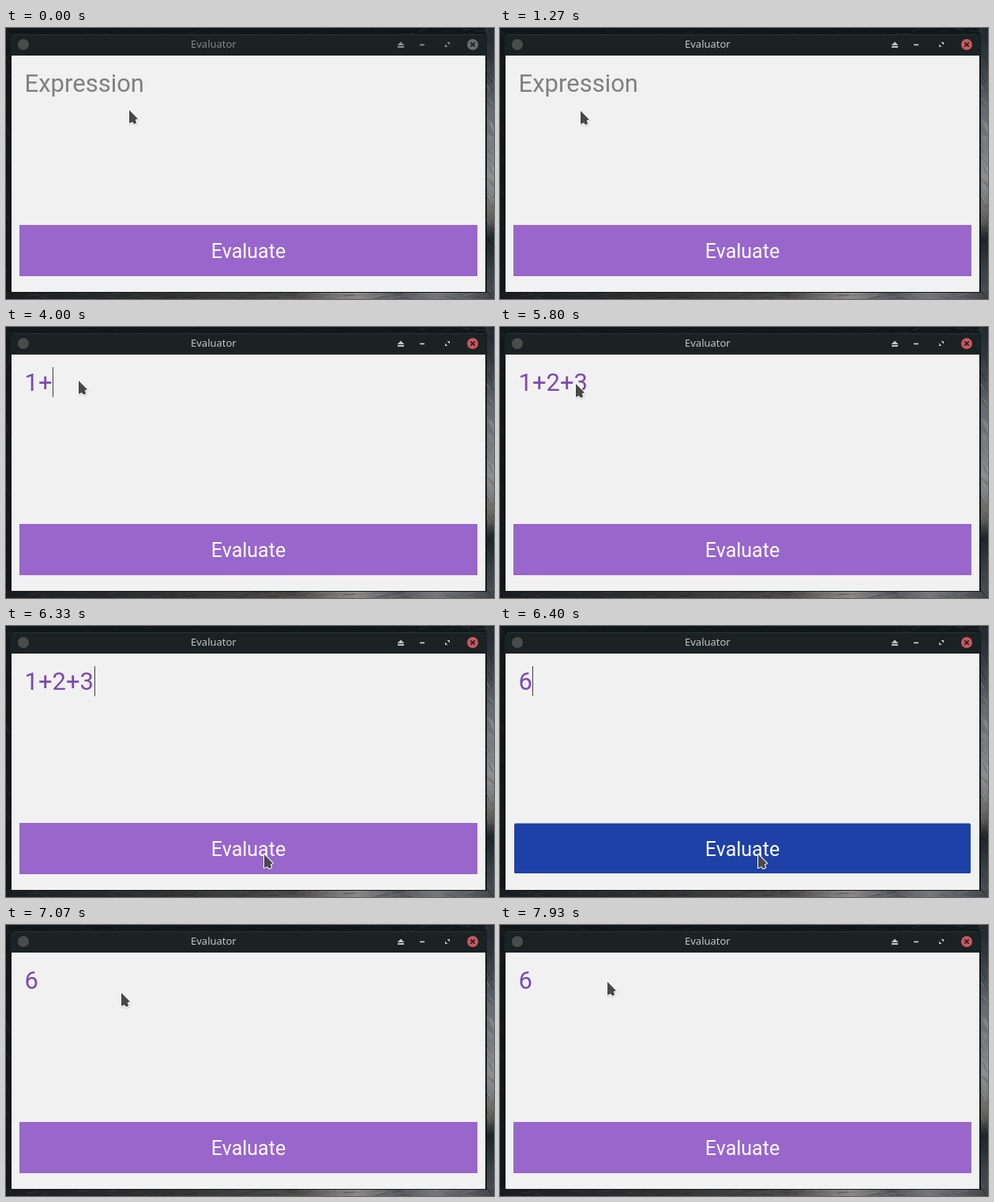
Animation of 618x344 px, one loop 8 s. Source, as an HTML page:

```html
<!DOCTYPE html>
<html lang="en">
<head>
<meta charset="utf-8">
<title>Evaluator</title>
<style>
  html, body { margin: 0; width: 100%; height: 100%; overflow: hidden; background: #11181c; }
  svg { display: block; width: 618px; height: 344px; }
  text { white-space: pre; }
  .app { font-family: Roboto, sans-serif; }
</style>
</head>
<body>
<svg viewBox="0 0 618 344">
  <defs>
    <linearGradient id="side" x2="0" y2="1">
      <stop offset="0" stop-color="#20272d"/>
      <stop offset=".1" stop-color="#2e353c"/>
      <stop offset=".3" stop-color="#636970"/>
      <stop offset=".55" stop-color="#8a8d90"/>
      <stop offset=".7" stop-color="#66635f"/>
      <stop offset=".78" stop-color="#1c2228"/>
      <stop offset=".9" stop-color="#3a4148"/>
      <stop offset="1" stop-color="#505458"/>
    </linearGradient>
    <linearGradient id="floor">
      <stop offset="0" stop-color="#1a1d1f"/>
      <stop offset=".35" stop-color="#333333"/>
      <stop offset=".6" stop-color="#4f4d4c"/>
      <stop offset=".72" stop-color="#8c8a88"/>
      <stop offset=".8" stop-color="#55555a"/>
      <stop offset=".88" stop-color="#77777a"/>
      <stop offset="1" stop-color="#404448"/>
    </linearGradient>
  </defs>

  <rect width="618" height="344" fill="#11181c"/>
  <rect x="607" width="11" height="344" fill="url(#side)"/>
  <rect y="335" width="618" height="9" fill="url(#floor)"/>
  <g id="fur" stroke-width="1"></g>

  <path d="M5 336V12q0-4 4-4H605q4 0 4 4V336Z" fill="#141a1c"/>
  <path d="M6 35V12q0-3 3-3H605q3 0 3 3V35Z" fill="#1b2224"/>
  <path d="M9 8.5H605" stroke="#2a3234"/>
  <rect x="7" y="35" width="600" height="300" fill="#f1f1f1"/>

  <circle cx="22" cy="21" r="7" fill="#4b4b4b"/>
  <text id="title" x="234" y="25" font-size="13" font-family="Noto Sans, sans-serif">Evaluator</text>
  <g id="controls">
    <path d="M495.5 22L500 17.5L504.500 22ZM496 23h8v2h-8ZM524 20.500h6v1.700h-6ZM558.500 18h3.500v3.500ZM556 20.500v3.500h3.500Z"/>
  </g>
  <circle id="close" cx="591" cy="21" r="7"/>
  <path d="M588.300 18.300l5.400 5.400m0-5.400l-5.400 5.400" stroke="#1b2224" stroke-width="1.700"/>

  <text id="input" class="app" x="23.6" y="81" font-size="31"></text>
  <rect id="caret" y="51" width="1" height="38" fill="#404040"/>

  <rect id="button"/>
  <text class="app" x="307" y="292" font-size="25" fill="#fff" text-anchor="middle">Evaluate</text>

  <g id="mouse" stroke-linejoin="round">
    <path d="M0 0L11 11.200L7.800 12.400L9.300 16.500L6.300 18L4 15.200L0 17Z"
      fill="none" stroke="#000" stroke-opacity=".1" stroke-width="3" transform="translate(.5 1)"/>
    <path d="M0 0L11 11.200L7.800 12.400L9.300 16.500L6.300 18L4 15.200L0 17Z"
      fill="#484848" stroke="#fff" stroke-width="2" paint-order="stroke"/>
  </g>
</svg>
<script>
const $ = id => document.getElementById(id);
const set = (id, attrs) => {
  for (const k in attrs) $(id).setAttribute(k, attrs[k]);
};

// Times are in ticks of 1/15 s.
const TICKS = 120;
const path = [
  [3, 156, 104], [6, 101, 83], [16, 101, 83], [20, 102, 106], [21, 102, 106],
  [26, 92, 71], [27, 92, 71], [29, 92, 68], [86, 92, 68], [87, 96, 72],
  [94, 327, 290], [100, 327, 290], [108, 135, 74], [110, 136, 72]
];
const typed = [
  [0, ''], [55, '1'], [60, '1+'], [69, '1+2'], [74, '1+2+'], [80, '1+2+3'], [96, '6']
];
const caretOn = [[29, 37], [45, 52], [55, 67], [69, 87], [95, 97], [112, 119]];

const within = (n, [from, to]) => n >= from && n < to;

// Hand-like easing: quick start, slower landing.
function ease(u) {
  const v = 1 - (1 - u) ** 1.4;
  return v * v * (3 - 2 * v);
}

function mouseAt(n) {
  const i = path.findIndex(p => p[0] >= n);
  if (i < 1) return (i ? path[path.length - 1] : path[0]).slice(1);
  const a = path[i - 1], b = path[i];
  const e = ease((n - a[0]) / (b[0] - a[0]));
  return [1, 2].map(k => Math.round(a[k] + (b[k] - a[k]) * e));
}

// Wallpaper hairs in the strips around the window.
function growFur() {
  let seed = 11, out = '';
  const rnd = () => (seed = seed * 16807 % 2147483647) / 2147483647;
  const hair = (x, y, dx, dy, light) => {
    const v = Math.round(light * (.4 + rnd()));
    out += `<path d="M${x} ${y}l${dx} ${dy}" stroke="rgb(${v},${v + 3},${v + 7})" stroke-opacity=".5"/>`;
  };
  for (let i = 0; i < 90; i++) {
    const y = rnd() * 344, x = rnd() * 618;
    hair(606 + rnd() * 10, y, 4 + rnd() * 6, 6 + rnd() * 10, y > 70 && y < 240 ? 130 : 60);
    hair(rnd() * 5 - 2, y, 4, 6 + rnd() * 6, 28);
    hair(x, rnd() * 8, 10, 3 - rnd() * 6, x > 500 ? 45 : 24);
    hair(x, 336 + rnd() * 8, 14, 4 - rnd() * 8, x > 380 ? 110 : 50);
  }
  $('fur').innerHTML = out;
}

function draw(n) {
  const active = n >= 10;
  const text = typed.filter(t => t[0] <= n).pop()[1];
  const [x, y] = mouseAt(n);

  set('title', { fill: active ? '#c0c7ca' : '#81888b' });
  set('controls', { fill: active ? '#c0c7ca' : '#8b9295' });
  set('close', { fill: active ? '#cc575d' : '#666e70' });

  $('input').textContent = text || 'Expression';
  set('input', { fill: text ? '#7b49ae' : '#808080' });
  set('caret', {
    x: Math.round(23 + 17.75 * text.length),
    visibility: caretOn.some(r => within(n, r)) ? 'visible' : 'hidden'
  });

  set('button', n === 96
    ? { x: 18, y: 250.5, width: 578, height: 63.5, rx: 1.5, fill: '#1e41a7' }
    : { x: 17, y: 250, width: 580, height: 65, rx: 0, fill: '#9966cc' });
  set('mouse', { transform: `translate(${x} ${y})` });
}

function frame() {
  draw(Math.floor((performance.now() + 4) * .015) % TICKS);
  requestAnimationFrame(frame);
}

growFur();
frame();
</script>
</body>
</html>
```
